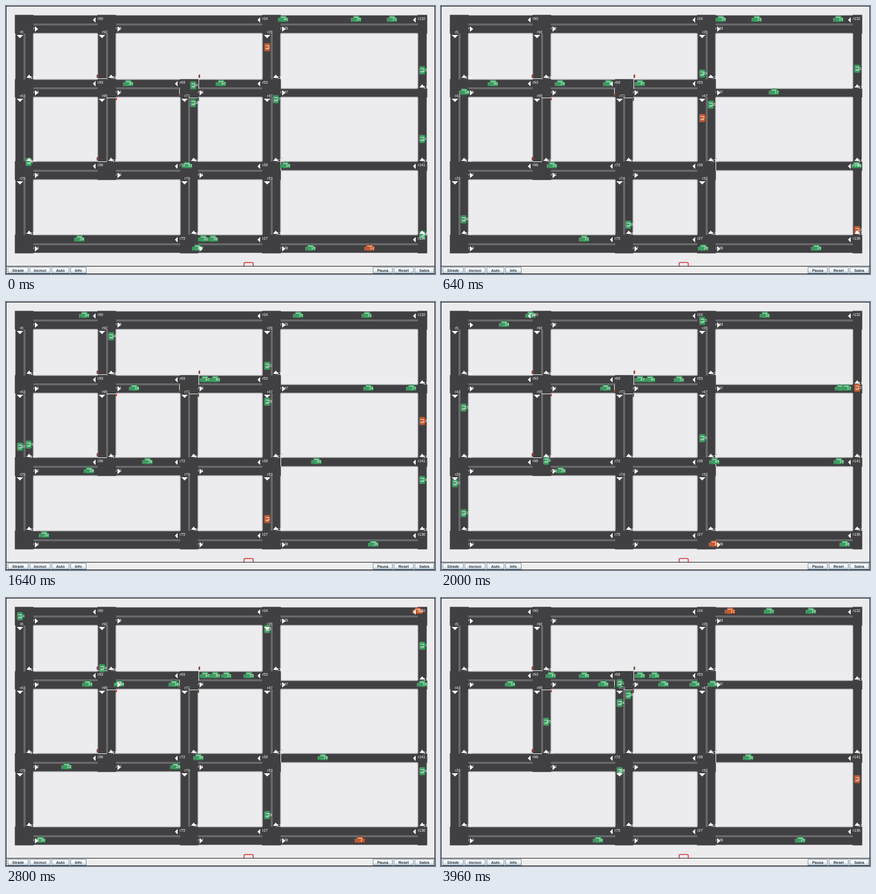
Recreate the animation shown at these times as an HTML page with a canvas. Size 800 by 500 pixels, loop 4 s.

```html
<!DOCTYPE html>
<html lang="it">
<head>
<meta charset="utf-8">
<style>
  html, body { margin: 0; width: 100%; height: 100%; overflow: hidden; background: #ecebee; }
  canvas { display: block; }
</style>
</head>
<body>
<canvas id="stage" width="800" height="500"></canvas>
<script>
const ctx = document.getElementById('stage').getContext('2d');
const LOOP = 4000, STEP = 40, LIGHT_SWITCH = 3120;
const ROAD = '#404042', EDGE = '#98989b', GROUND = '#ecebee';
const GREEN = '#3d9c60', ORANGE = '#c05a30';
const FONT = '"Liberation Sans", Arial, sans-serif';

// Route commands: M start, H/V drive to x/y, W wait until the odometer reads a value.
const cars = [
  ['40', 'M517 24H487V144H390W620H368W675H0'],
  ['29', 'M653 24H487V451H800'],
  ['21', 'M720 24H487V144H415W540H411W622H386W708H333V400'],
  ['15', 'M776 120V24H487V144W513H432W644H371'],
  ['11', 'M776 248V24H487V144H465W709H390'],
  ['45', 'M776 427V297H196V0'],
  ['19', 'M568 451H776V297H503V160H800'],
  ['26', 'M357 451H776V297H0'],
  ['22', 'M368 434W30H42V314H333V600'],
  ['38', 'M386 434W68H349V297H196V160H293W643H308W669H800'],
  ['28', 'M137 434H42V314H316W573H349V181'],
  ['18', 'M42 291V160H313W616H800'],
  ['33', 'M338 297H42V160H152W601H209W682H800'],
  ['16', 'M521 297H503V160H756W527H776W554V24H0'],
  ['17', 'M503 174V160H756W400H774W474H776V24H0'],
  ['24', 'M349 148V144H196V24H106V41H179V160W586H333V600'],
  ['14', 'M349 181W57V144H196V24H26V160H800'],
  ['47', 'M401 144H371W610H0'],
  ['30', 'M228 144H26V451H800'],
  ['2', 'M487 77V451H776V0', ORANGE],
  ['12', 'M678 451H776V160W403V24H0', ORANGE],
].map(([label, route, color = GREEN]) => ({
  label, color,
  startsVertical: /[HV]/.exec(route)[0] === 'V',
  steps: route.match(/[A-Z][\d ]+/g).map(s => [s[0], ...s.slice(1).split(' ').map(Number)]),
}));

// Shared odometer: time in ms, distance in px.
const pace = [[0, 0], [640, 131.5], [1640, 327.5], [2320, 456], [2800, 547], [3360, 658], [4000, 784]];
function odometer(t) {
  const i = pace.findIndex(p => p[0] > t);
  const [t0, d0] = pace[i - 1], [t1, d1] = pace[i];
  return d0 + (d1 - d0) * (t - t0) / (t1 - t0);
}

function locate(car, distance) {
  const pos = { x: 0, y: 0, vertical: car.startsVertical };
  let used = 0;
  for (const [cmd, a, b] of car.steps) {
    if (cmd === 'M') { pos.x = a; pos.y = b; continue; }
    if (used >= distance) break;
    if (cmd === 'W') { used = Math.max(used, a); continue; }
    const axis = cmd === 'H' ? 'x' : 'y';
    const delta = a - pos[axis], length = Math.abs(delta);
    pos[axis] += Math.sign(delta) * Math.min(length, distance - used);
    pos.vertical = cmd === 'V';
    used += length;
  }
  return pos;
}

function rect(color, x, y, w, h) {
  ctx.fillStyle = color;
  ctx.fillRect(x, y, w, h);
}

function rounded(color, x, y, w, h, r) {
  ctx.fillStyle = color;
  ctx.beginPath();
  ctx.roundRect(x, y, w, h, r);
  ctx.fill();
}

function poly(color, ...points) {
  ctx.fillStyle = color;
  ctx.beginPath();
  for (let i = 0; i < points.length; i += 2) ctx.lineTo(points[i], points[i + 1]);
  ctx.fill();
}

function text(str, x, y, color = '#fff', style = '7px') {
  ctx.font = `${style} ${FONT}`;
  ctx.fillStyle = color;
  ctx.fillText(str, x, y);
}

function drawCar({ label, color }, { x, y, vertical }) {
  const shine = 'rgba(255,255,255,0.45)';
  ctx.save();
  ctx.translate(Math.round(x), Math.round(y));
  if (vertical) {
    rounded(color, -5.5, -7.5, 11, 15, 2);
    rect(shine, -3, -4, 6, 2);
    rect(shine, -3, 1, 6, 3);
    text(label, 1, 2);
  } else {
    rounded(color, -10, -2, 19, 7.5, 1);
    rounded(color, -6, -6, 12, 6, 2);
    rect(shine, -4, -4, 8, 2);
    for (const wheel of [-8, 4]) rect('rgba(0,0,0,0.25)', wheel, 4, 3, 1.5);
    text(label, 1, 3);
  }
  ctx.restore();
}

const blocks = [
  [51, 51, 171, 137], [205, 51, 478, 137], [512, 51, 768, 154],
  [51, 170, 171, 290], [205, 170, 325, 290], [358, 170, 478, 290], [512, 170, 768, 290],
  [51, 324, 325, 427], [358, 324, 478, 427], [512, 307, 768, 427],
];

// Crossing rows: top, bottom, and the columns that meet them.
const columns = [[17, 51], [171, 205], [325, 358], [478, 512], [768, 785]];
const crossings = [[17, 51, '0134'], [137, 170, '0123'], [154, 170, '4'],
  [290, 324, '0123'], [290, 307, '4'], [427, 461, '0234']];

function hDivider(y, ...spans) {
  for (const [a, b] of spans) {
    rect('#8d8d90', a, y - 1, b - a, 1);
    rect('#8d8d90', a, y + 1, b - a, 1);
  }
}

function vDivider(x, ...spans) {
  for (const [a, b] of spans) {
    rect('#8d8d90', x - 1, a, 1, b - a);
    rect('#8d8d90', x + 1, a, 1, b - a);
  }
}

function drawRoads() {
  rect(GROUND, 0, 0, 800, 500);
  rect(EDGE, 17, 17, 768, 444);
  rect(ROAD, 18, 18, 766, 442);
  for (const [x0, y0, x1, y1] of blocks) {
    rect(EDGE, x0 - 1, y0 - 1, x1 - x0 + 2, y1 - y0 + 2);
    rect(GROUND, x0 + 0.5, y0 + 0.5, x1 - x0 - 1, y1 - y0 - 1);
  }
  for (const [top, bottom, cols] of crossings)
    for (const c of cols) {
      const [left, right] = columns[c];
      rect(ROAD, left - 0.5, top - 0.5, right - left + 1, bottom - top + 1);
    }
  const west = [51, 171], mid = [205, 325], east = [358, 478], far = [512, 768];
  hDivider(34, west, [205, 478], far);
  hDivider(153, west, mid, east);
  hDivider(307, west, mid, east);
  hDivider(444, [51, 325], east, far);
  const north = [51, 137], centre = [170, 290], south = [324, 427];
  vDivider(34, north, centre, south);
  vDivider(188, north, centre);
  vDivider(341, centre, south);
  vDivider(495, north, centre, south);
}

function drawLights(t) {
  const switched = t >= LIGHT_SWITCH;
  const red = '#b5432b', green = '#2f7d4c';
  rect('#fff', 171, 135, 17, 1);
  rect('#fff', 188, 171, 17, 1);
  rect('#fff', 171, 290, 17, 1);
  rect('#fff', 342, 171, 17, 1);
  rect('#fff', 359, 137, 1, 17);
  rect('#fff', 323, 154, 1, 14);
  rect('#fff', 512, 291, 1, 16);
  const lamp = (x, y, color) => {
    rect('#665751', x - 1, y - 3, 3, 6);
    rect(color, x - 1, y - 2, 3, 3);
  };
  lamp(170, 131, red);
  lamp(170, 285, red);
  lamp(360, 131, switched ? green : red);
  lamp(323, 167, switched ? green : '#8a4a30');
  lamp(358, 174, switched ? red : green);
  rect('#e8c8c6', 512, 283, 3, 5);
  rect('#e02418', 204, 172, 3, 3);
  rect('#d8908a', 205, 175, 1, 3);
}

const signs = {
  left: { 26: 'r90@171 r24@478 r132@768', 145: 'r93@171 r69@324 r53@478',
    299: 'r96@171 r72@324 r39@478 r141@768', 436: 'r75@324 r27@478 r136@768' },
  right: { 43: 'r4@51 r25@205 r133@512', 162: 'r46@51 r52@205 r55@358 r137@512',
    316: 'r22@51 r70@205 r31@358', 453: 'r13@51 r37@358 r128@512' },
  down: { 57: 'r6@26 r92@179 r26@487', 176: 'r43@26 r95@179 r71@333 r47@487',
    330: 'r29@26 r74@333 r33@487' },
  up: { 131: 'r134@43 r68@196 r131@503', 149: 'r13@776',
    286: 'r140@43 r187@196 r44@350 r132@503 r14@776', 422: 'r115@43 r66@350 r120@503 r13@776' },
};

const drawSign = {
  left(name, x, y) { text(name, x, y); poly('#fff', x - 9, y, x - 4, y - 5, x - 4, y + 5); },
  right(name, x, y) { text(name, x, y + 1); poly('#fff', x + 9, y, x + 3, y - 5, x + 3, y + 5); },
  down(name, x, y) { text(name, x, y - 6); poly('#fff', x - 6, y - 3, x + 6, y - 3, x, y + 3); },
  up(name, x, y) { text(name, x, y + 5); poly('#fff', x - 5, y + 3, x + 5, y + 3, x, y - 3); },
};

function drawSigns() {
  for (const [direction, rows] of Object.entries(signs))
    for (const [y, row] of Object.entries(rows))
      for (const sign of row.split(' ')) {
        const [name, x] = sign.split('@');
        drawSign[direction](name, +x, +y);
      }
}

const buttons = [['Strade', 3, 42], ['Incroci', 44, 83], ['Auto', 85, 118], ['Info', 120, 150],
  ['Pausa', 684, 721], ['Reset', 723, 760], ['Salva', 762, 798]];

function drawToolbar() {
  ctx.strokeStyle = '#d8242c';
  ctx.lineWidth = 1.5;
  ctx.beginPath();
  ctx.roundRect(444, 478.5, 17, 10, 2);
  ctx.stroke();
  rect('#eeeeee', 0, 485, 800, 15);
  rect('#111', 0, 485, 800, 1);
  const shade = ctx.createLinearGradient(0, 487, 0, 499);
  shade.addColorStop(0, '#dfe9f3');
  shade.addColorStop(0.35, '#fff');
  shade.addColorStop(1, '#b8cfe5');
  ctx.textAlign = 'center';
  for (const [name, x0, x1] of buttons) {
    rect('#7a8a99', x0, 487, x1 - x0, 12);
    rect(shade, x0 + 1, 488, x1 - x0 - 2, 10);
    text(name, (x0 + x1) / 2, 495.5, '#333', 'bold 7px');
  }
  ctx.textAlign = 'left';
  ctx.strokeStyle = '#222';
  ctx.lineWidth = 1;
  ctx.strokeRect(0.5, 0.5, 799, 499);
}

const origin = performance.now();
function draw(now) {
  const t = Math.floor(Math.max(0, now - origin) % LOOP / STEP) * STEP;
  const distance = odometer(t);
  drawRoads();
  drawLights(t);
  for (const car of cars) drawCar(car, locate(car, distance));
  drawSigns();
  drawToolbar();
  requestAnimationFrame(draw);
}
draw(origin);
</script>
</body>
</html>
```
